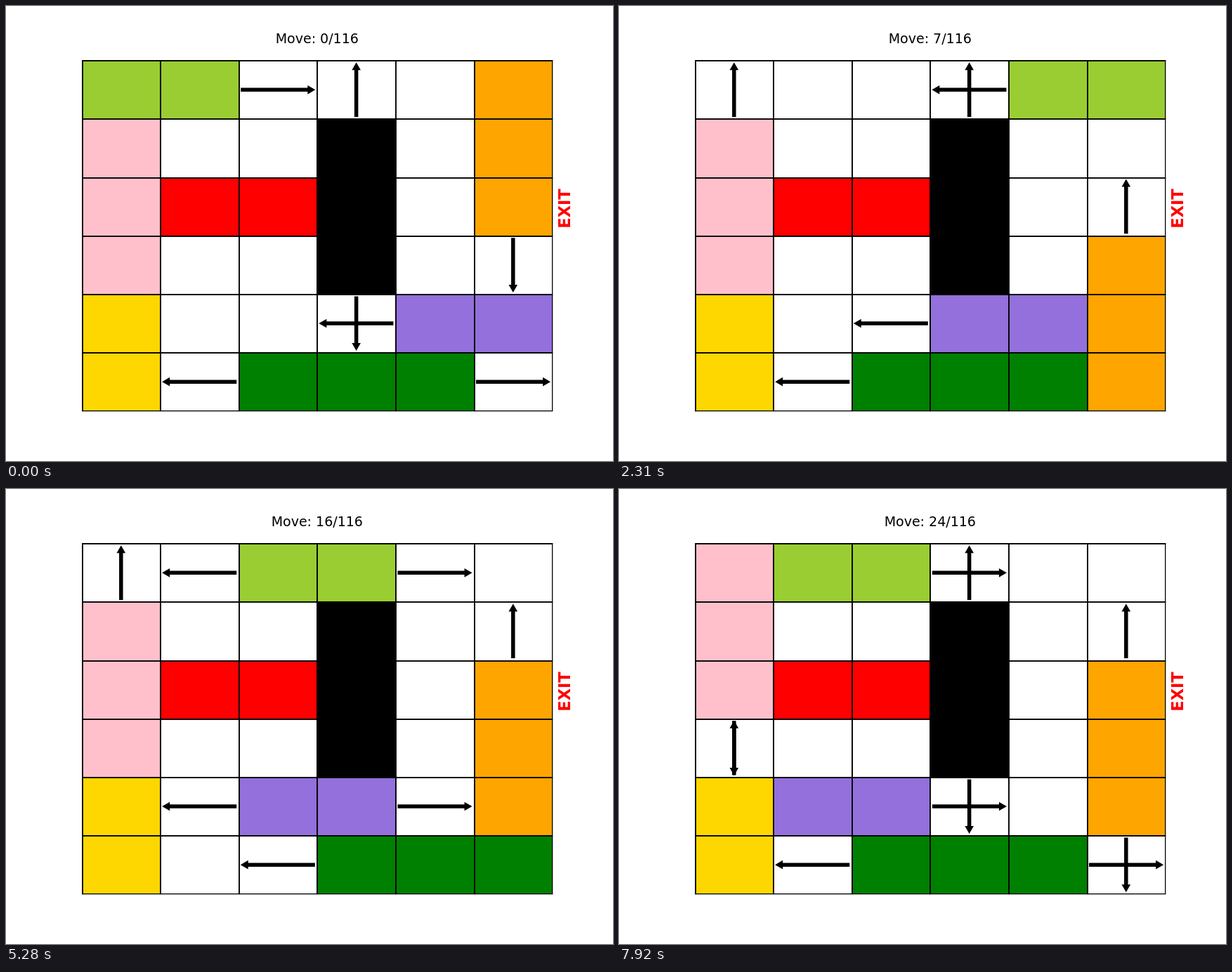
An HTML page that plays this animation: 864 px wide and 648 px high, repeating every 8000 ms.

```html
<!DOCTYPE html>
<html lang="en">
<head>
<meta charset="utf-8">
<title>Sliding block puzzle</title>
<style>
  html, body { margin: 0; width: 100%; height: 100%; overflow: hidden; background: #fff; }
  svg { display: block; width: 864px; height: 648px; }
  text { font-family: "DejaVu Sans", sans-serif; text-anchor: middle; }
</style>
</head>
<body>
<svg viewBox="0 0 864 648" xmlns="http://www.w3.org/2000/svg">
  <g id="blocks"></g>
  <g id="grid"></g>
  <g id="arrows"></g>
  <text id="title" x="442.8" y="53.4" font-size="19"></text>
  <text transform="translate(803 288.5) rotate(-90)" font-size="22.5" font-weight="bold" fill="red">EXIT</text>
</svg>
<script>
const LOOP = 8000, STEP = 330, TOTAL = 116, SIZE = 6;
const LEFT = 108, TOP = 77.76, CELL_W = 111.6, CELL_H = 83.16;

// The position runs along the block's own axis.
const START = {
  lime:   { color: '#9acd32', across: true,  lane: 0, pos: 0, len: 2 },
  pink:   { color: '#ffc0cb', across: false, lane: 0, pos: 1, len: 3 },
  red:    { color: '#ff0000', across: true,  lane: 2, pos: 1, len: 2 },
  black:  { color: '#000000', across: false, lane: 3, pos: 1, len: 3 },
  orange: { color: '#ffa500', across: false, lane: 5, pos: 0, len: 3 },
  purple: { color: '#9370db', across: true,  lane: 4, pos: 4, len: 2 },
  gold:   { color: '#ffd700', across: false, lane: 0, pos: 4, len: 2 },
  green:  { color: '#008000', across: true,  lane: 5, pos: 2, len: 3 }
};

const MOVES = [
  ['purple', 3], ['orange', 3], ['lime', 4], ['black', 0], ['green', 1], ['green', 2],
  ['black', 1], ['orange', 1], ['purple', 1], ['lime', 2], ['purple', 4], ['purple', 1],
  ['green', 1], ['purple', 2], ['orange', 2], ['green', 3], ['green', 2], ['lime', 1],
  ['purple', 1], ['lime', 4], ['lime', 0], ['lime', 3], ['pink', 0], ['lime', 1]
];

const byId = id => document.getElementById(id);
const edgeX = col => Math.floor(LEFT + col * CELL_W);
const edgeY = row => Math.floor(TOP + row * CELL_H);
const cellAt = (block, pos) => block.across ? [pos, block.lane] : [block.lane, pos];

function rect(x, y, w, h, color) {
  return `<rect x="${x}" y="${y}" width="${w}" height="${h}" fill="${color}"/>`;
}

function gridLines() {
  const right = edgeX(SIZE) + 1.2, bottom = edgeY(SIZE) + 1.2;
  let out = '';
  for (let i = 0; i <= SIZE; i++) {
    const weight = i < SIZE ? 1.9 : 1.3;
    out += rect(edgeX(i), edgeY(0), weight, bottom - edgeY(0), '#000');
    out += rect(edgeX(0), edgeY(i), right - edgeX(0), weight, '#000');
  }
  return out;
}

function blockShape(block) {
  const [col, row] = cellAt(block, block.pos);
  const [endCol, endRow] = cellAt({ ...block, lane: block.lane + 1 }, block.pos + block.len);
  const x = edgeX(col), y = edgeY(row);
  return rect(x, y, edgeX(endCol) - x + 1, edgeY(endRow) - y + 1, block.color);
}

function arrow(block, pos, forward) {
  const [col, row] = cellAt(block, pos);
  const half = (block.across ? CELL_W : CELL_H) / 2;
  const tip = half - 2.5, neck = tip - 11, tail = 3 - half;
  const angle = (block.across ? 0 : 90) + (forward ? 0 : 180);
  const x = LEFT + (col + 0.5) * CELL_W, y = TOP + (row + 0.5) * CELL_H;
  return `<path transform="translate(${x} ${y}) rotate(${angle})"
    d="M${tail} -2.75H${neck}V-6.3L${tip} 0L${neck} 6.3V2.75H${tail}Z"/>`;
}

function boardAfter(count) {
  const board = {};
  for (const name in START) board[name] = { ...START[name] };
  MOVES.slice(0, count).forEach(([name, pos]) => { board[name].pos = pos; });
  return Object.values(board);
}

function arrowsFor(blocks) {
  const taken = new Set();
  for (const b of blocks)
    for (let i = 0; i < b.len; i++) taken.add(cellAt(b, b.pos + i).join());
  const isFree = (b, pos) => pos >= 0 && pos < SIZE && !taken.has(cellAt(b, pos).join());
  return blocks.map(b => {
    const before = b.pos - 1, after = b.pos + b.len;
    return (isFree(b, before) ? arrow(b, before, false) : '') +
           (isFree(b, after) ? arrow(b, after, true) : '');
  }).join('');
}

function draw(count) {
  const blocks = boardAfter(count);
  byId('blocks').innerHTML = blocks.map(blockShape).join('');
  byId('arrows').innerHTML = arrowsFor(blocks);
  byId('title').textContent = `Move: ${count}/${TOTAL}`;
}

let shown = 0;
const began = performance.now();

function tick() {
  const time = (performance.now() - began) % LOOP;
  const count = Math.min(Math.floor(time / STEP), MOVES.length);
  if (count !== shown) draw(shown = count);
  requestAnimationFrame(tick);
}

byId('grid').innerHTML = gridLines();
draw(0);
requestAnimationFrame(tick);
</script>
</body>
</html>
```
